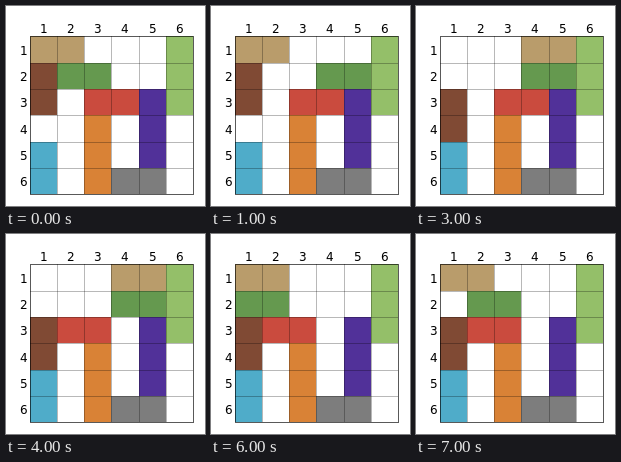
An HTML page with a canvas that plays this animation: 199x200 px, repeating every 8 s.

```html
<!DOCTYPE html>
<html>
<head>
<meta charset="utf-8">
<style>
  html, body { margin: 0; width: 100%; height: 100%; overflow: hidden; background: #fff; }
  canvas { display: block; }
</style>
</head>
<body>
<canvas id="board" width="199" height="200"></canvas>
<script>
const ctx = document.getElementById('board').getContext('2d');
const SIZE = 6, STEP_MS = 1000, STEPS = 8;
const gridX = i => Math.round(23.9 + 27.19 * i);
const gridY = i => Math.round(30.4 + 26.33 * i);

// Blocks: colour, column, row, width and height in cells.
const blocks = {
  tan:    ['#b99c6b', 0, 0, 2, 1],
  brown:  ['#804a34', 0, 1, 1, 2],
  green:  ['#65994f', 1, 1, 2, 1],
  red:    ['#ca4b3e', 2, 2, 2, 1],
  purple: ['#513199', 4, 2, 1, 3],
  lime:   ['#94bf69', 5, 0, 1, 3],
  orange: ['#d98236', 2, 3, 1, 3],
  blue:   ['#4facc9', 0, 4, 1, 2],
  gray:   ['#7d7d7d', 3, 5, 2, 1]
};

// One move per step: block, column shift, row shift.
const moves = [
  ['green', 2, 0], ['brown', 0, 1], ['tan', 3, 0], ['red', -1, 0],
  ['green', -3, 0], ['tan', -3, 0], ['green', 1, 0]
];

function drawBlock(name, done) {
  let [color, col, row, w, h] = blocks[name];
  for (const [moved, dx, dy] of done) {
    if (moved === name) { col += dx; row += dy; }
  }
  const x = gridX(col), y = gridY(row);
  ctx.fillStyle = color;
  ctx.fillRect(x, y, gridX(col + w) - x, gridY(row + h) - y);
}

function drawGrid() {
  const left = gridX(0), top = gridY(0);
  const width = gridX(SIZE) - left, height = gridY(SIZE) - top;
  ctx.fillStyle = 'rgba(0, 0, 0, 0.28)';
  for (let i = 1; i < SIZE; i++) {
    ctx.fillRect(gridX(i), top, 1, height);
    ctx.fillRect(left, gridY(i), width, 1);
  }
  ctx.strokeStyle = 'rgba(0, 0, 0, 0.65)';
  ctx.strokeRect(left + 0.5, top + 0.5, width, height);
}

function drawLabels() {
  ctx.fillStyle = '#000';
  ctx.font = '12px "DejaVu Sans", sans-serif';
  for (let i = 0; i < SIZE; i++) {
    const centerX = (gridX(i) + gridX(i + 1)) / 2;
    const centerY = (gridY(i) + gridY(i + 1)) / 2;
    ctx.fillText(i + 1, Math.round(centerX - 3.8), 27);
    ctx.fillText(i + 1, 14, Math.round(centerY + 5));
  }
}

function draw() {
  const step = Math.floor(performance.now() / STEP_MS) % STEPS;
  const done = moves.slice(0, step);
  ctx.fillStyle = '#fff';
  ctx.fillRect(0, 0, 199, 200);
  for (const name in blocks) drawBlock(name, done);
  drawGrid();
  drawLabels();
  requestAnimationFrame(draw);
}
draw();
</script>
</body>
</html>
```
